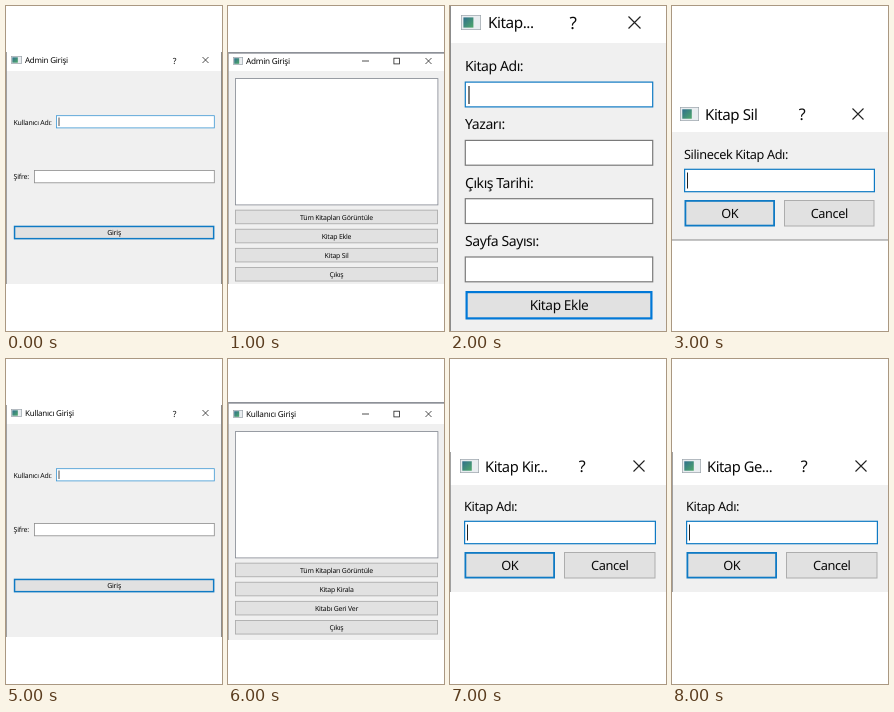
An HTML page for the animation above (9 s loop, 216 by 325 pixels).

```html
<!DOCTYPE html>
<html lang="tr">
<head>
<meta charset="utf-8">
<title>Kitap</title>
<style>
  html, body { margin: 0; width: 100%; height: 100%; overflow: hidden; background: #fff; }
  svg { display: block; width: 216px; height: 325px; }
  text {
    font-family: "Noto Sans", "Open Sans", sans-serif;
    letter-spacing: -0.03em;
    text-rendering: geometricPrecision;
    fill: #0a0a0a;
    white-space: pre;
  }
</style>
</head>
<body>
<svg id="stage" viewBox="0 0 216 325" xmlns="http://www.w3.org/2000/svg">
  <defs>
    <linearGradient id="teal" x1="0" y1="0" x2="1" y2="1">
      <stop offset="0" stop-color="#2f6f8c"/>
      <stop offset="1" stop-color="#4fa86a"/>
    </linearGradient>
  </defs>
</svg>
<script>
const NS = "http://www.w3.org/2000/svg";
const BLUE = "#0f7ac4", GREY = "#7a7a7a", PALE = "#adadad", PANEL = "#f0f0f0", EDGE = "#8c8c8c";
const STEP = 1000;
const stage = document.getElementById("stage");
let scene;

function add(tag, attrs, parent = scene) {
  const el = document.createElementNS(NS, tag);
  for (const k in attrs) el.setAttribute(k, attrs[k]);
  return parent.appendChild(el);
}

// Boxes are given by their outer edges; the border lies inside.
function box(x1, y1, x2, y2, fill, stroke, w = 0) {
  add("rect", {
    x: x1 + w / 2, y: y1 + w / 2, width: x2 - x1 - w, height: y2 - y1 - w,
    fill, stroke: stroke || "none", "stroke-width": w
  });
}

function line(d, w = 1, stroke = "#222") {
  add("path", { d, stroke, "stroke-width": w, fill: "none" });
}

// y is the middle of the capital letters
function label(str, x, y, size, anchor = "start") {
  add("text", { x, y: y + size * 0.357, "font-size": size, "text-anchor": anchor }).textContent = str;
}

function button(str, x1, y1, x2, y2, size, stroke = PALE, w = 1) {
  box(x1, y1, x2, y2, "#e1e1e1", stroke, w);
  label(str, (x1 + x2) / 2, (y1 + y2) / 2 + 0.3, size, "middle");
}

function cross(x, y, r, w) {
  line(`M${x - r} ${y - r}L${x + r} ${y + r}M${x + r} ${y - r}L${x - r} ${y + r}`, w);
}

function icon(x, y, w, h) {
  box(x, y, x + w, y + h, "#e9edf0", "#9aa3aa", 0.7);
  const m = w * 0.12;
  box(x + m, y + m, x + w * 0.62, y + h - m, "url(#teal)");
}

function loginWindow(title) {
  box(0, 65, 216, 278, PANEL);
  box(0, 46, 0.8, 278, EDGE);
  box(215, 46, 216, 278, EDGE);
  icon(5, 50, 11, 8);
  label(title, 19, 54.6, 8);
  label("?", 168.5, 54.5, 8.5, "middle");
  cross(199.5, 54, 3, 0.8);
  label("Kullanıcı Adı:", 7.5, 116.2, 6.9);
  box(50, 109.3, 208.7, 122.3, "#fff", "#3d97d3", 0.8);
  line("M53 111.5V120", 0.8);
  label("Şifre:", 7.5, 170.8, 7);
  box(28, 164, 208.7, 177.2, "#fff", "#8c8c8c", 0.8);
  button("Giriş", 7.8, 219.7, 208.4, 233.4, 7, BLUE, 1.5);
}

function menuWindow(title, top, bottom, items) {
  box(0, top, 216, top + 1.7, "#8d9198");
  box(0, 65, 216, bottom, PANEL);
  box(0, top, 0.8, bottom, "#a0a0a0");
  icon(5, 51, 10, 8);
  label(title, 18, 55.5, 8.2);
  line("M134 55H141", 0.8);
  box(165.5, 51.8, 172, 58.3, "none", "#222", 0.8);
  cross(200.5, 55, 3, 0.8);
  box(7, 72.2, 210.3, 199.3, "#fff", "#828790", 0.8);
  items.forEach((s, i) => button(s, 7, 203.7 + i * 19.1, 210, 218.2 + i * 19.1, 6.9, PALE, 0.9));
}

function promptWindow({ title, prompt, size, head, x, y, right, left }) {
  box(0, 126, 216, y + 126, PANEL);
  if (left) box(0, 93, 0.8, y + 126, EDGE);
  else box(0, y + 125.5, 216, y + 126.5, "#8a8a8a");
  icon(x - 4, y - 7, 19, 14);
  label(title, x + 21, y + 0.5, head);
  label("?", x + 118, y, 16, "middle");
  cross(right - 17, y, 5.5, 1.1);
  label(prompt, x, y + 40.3, size);
  box(x, y + 54.7, right, y + 78.3, "#fff", BLUE, 1.2);
  line(`M${x + 3.5} ${y + 58.5}v16`, 1);
  button("OK", x + 0.5, y + 86, x + 91, y + 112.5, size, BLUE, 1.8);
  button("Cancel", x + 100, y + 86, right - 0.5, y + 112.5, size);
}

function addBook() {
  box(0, 37, 216, 325, PANEL);
  box(0, 0, 1, 325, EDGE);
  icon(11, 9, 20, 15);
  label("Kitap...", 38, 17, 15.3);
  label("?", 123, 16.5, 17, "middle");
  cross(184.5, 16.5, 6, 1.2);
  ["Kitap Adı:", "Yazarı:", "Çıkış Tarihi:", "Sayfa Sayısı:"].forEach((s, i) => {
    const y = i * 58.3;
    label(s, 15, 60 + y, 14);
    box(14.7, 75.5 + y, 203.3, 101.5 + y, "#fff", i ? GREY : BLUE, 1.2);
  });
  line("M19 80V98", 1.2);
  button("Kitap Ekle", 15.5, 285, 202.5, 313.5, 13.7, "#0078d7", 2.2);
}

const books = `Gumus Dugmeli Yolcular, Rahmettin Esen, 1943, 160
Ceviz Sepetleri, Luiz Tadeo De Marvoncales, 1968, 182
2617, Walter Hensby, 1949, 352
Lacivert Ikindi, Fabricio Moreda Taluez, 1981, 120
Dokmeci, Renato Valhos, 1988, 184
Uzun Bekci, Bertrand De Mont Verraily, 6 Nisan 1943, 96
Kirecci, Hubert Lanoy, 194, 111
Dut Yolu, Perin Taslibeyoglu, 2012, 536
Uyandirilanlar, Ufuk Soyal, 1972, 724
Dalgin Usta, Kerem Ozdalan, 1959, 156
Sag Omzum, Brendan Fallow, 1954, 190
Turna Bartholomew Ellingby, Howard Pell , 1970, 152
Tuzlukent, Nadir Saloub, 1988, 318
Misir Bahcesinde Kardesler, T. R. Wellinger , 16 Temmuz 1951,
198
Su Kiyi, Tamer Selic, 1974, 339
Ay Dogar Yola Duser, Temir Baytokov, 1991, 413
Beyit, Muzaffer Cemal Yurtsan, 2011, 658
Marte'nin Odalari, Torvald Haugmer , 5 Aralik 1991, 591
Yele, Nadir Fikri Uzundirek, 1962, 512
Hollweger Gulumserken, Ervan T. Malin , 1992, 416
Onbirinci Dahiliye Odalari, Selami Tura, 1930, 112
Kum, Esin Solak, 2009, 420
Ceper, Kamil Necdi Durmanar, 1949, 419
Sedir Bahriye, Selami Tura, 1931, 128
Kadircik, Faruk Tumra, 1982, 376
Sari Kayik, Temir Baytokov, 1970, 168
Tarlakoyu, Vedat Seyfi Gunbilen, 1922, 544
Bozuk, Sadik Rasih Karacobanoglu, 1932, 215
Mavi Sardunyalar Kasabada, Valeriy Domnov, 1923, 150`.split("\n");

function bookList() {
  icon(2.5, 5.5, 9.5, 7.5);
  label("Kitap Listesi", 14.5, 9.4, 7.3);
  cross(208, 9, 2.3, 0.7);
  add("circle", { cx: 14.2, cy: 32.2, r: 8.2, fill: "#0c7cd5" });
  line("M14.2 30.7V36.7", 1.3, "#fff");
  add("circle", { cx: 14.2, cy: 28.3, r: 0.9, fill: "#fff" });
  books.forEach((s, i) => label(s, 32, 28 + i * 8.69, 6.3));
  box(0, 296, 216, 320, PANEL);
  box(0, 320, 216, 321, "#777");
  button("OK", 171.5, 302.7, 211.2, 315.2, 6.3, BLUE, 1.2);
}

const scenes = [
  () => loginWindow("Admin Girişi"),
  () => menuWindow("Admin Girişi", 46, 278, ["Tüm Kitapları Görüntüle", "Kitap Ekle", "Kitap Sil", "Çıkış"]),
  addBook,
  () => promptWindow({ title: "Kitap Sil", prompt: "Silinecek Kitap Adı:", size: 12.7, head: 15.1, x: 12, y: 108, right: 203 }),
  bookList,
  () => loginWindow("Kullanıcı Girişi"),
  () => menuWindow("Kullanıcı Girişi", 43, 281, ["Tüm Kitapları Görüntüle", "Kitap Kirala", "Kitabı Geri Ver", "Çıkış"]),
  () => promptWindow({ title: "Kitap Kir...", prompt: "Kitap Adı:", size: 12.8, head: 14.7, x: 14, y: 107, right: 206, left: true }),
  () => promptWindow({ title: "Kitap Ge...", prompt: "Kitap Adı:", size: 12.8, head: 14.7, x: 14, y: 107, right: 206, left: true })
].map(draw => {
  scene = add("g", { visibility: "hidden" }, stage);
  draw();
  return scene;
});

const start = performance.now();
let shown = -1;
function tick() {
  const n = Math.floor((performance.now() - start) / STEP) % scenes.length;
  if (n !== shown) {
    scenes.forEach((g, i) => g.setAttribute("visibility", i === n ? "visible" : "hidden"));
    shown = n;
  }
  requestAnimationFrame(tick);
}
tick();
</script>
</body>
</html>
```
